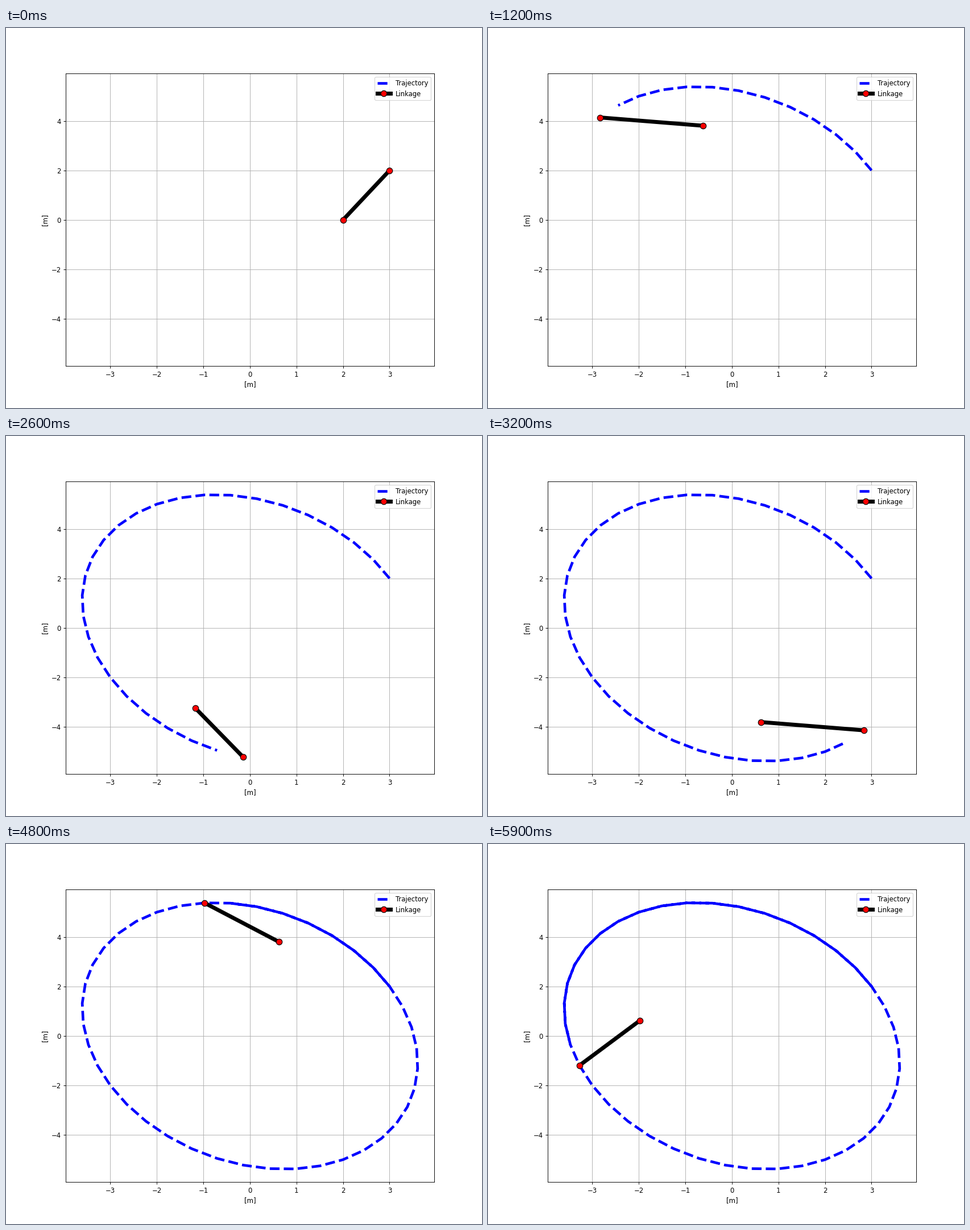
Write a matplotlib script that moves like this. It is 837 by 669 pixels and loops after 6 s.

```python
import numpy as np
import matplotlib.pyplot as plt
from matplotlib.animation import FuncAnimation

FRAMES = 60
STEPS_PER_TURN = 40
INTERVAL = 100

# Pivot travels on an ellipse while the link turns with the same angle.
angle = 2 * np.pi * np.arange(FRAMES) / STEPS_PER_TURN
cos, sin = np.cos(angle), np.sin(angle)
pivot_x, pivot_y = 2 * cos, 4 * sin
tip_x = pivot_x + cos - 2 * sin
tip_y = pivot_y + 2 * cos + sin

fig, ax = plt.subplots(figsize=(10.009, 8), dpi=83.625)
trail, = ax.plot([], [], "b--", lw=4, label="Trajectory")
link, = ax.plot([], [], "k-o", lw=6, ms=9, mfc="r", label="Linkage")

x_max = 1.1 * np.abs(tip_x).max()
y_max = 1.1 * np.abs(tip_y).max()
ax.set_xlim(-x_max, x_max)
ax.set_ylim(-y_max, y_max)
ax.set_xlabel("[m]")
ax.set_ylabel("[m]")
ax.grid(True)
ax.legend(loc="upper right")


def update(i):
    # The trail stops one step behind the tip.
    trail.set_data(tip_x[:i], tip_y[:i])
    link.set_data([pivot_x[i], tip_x[i]], [pivot_y[i], tip_y[i]])
    return trail, link


anim = FuncAnimation(fig, update, frames=FRAMES, interval=INTERVAL,
                     repeat=True, repeat_delay=0)
plt.show()
```
